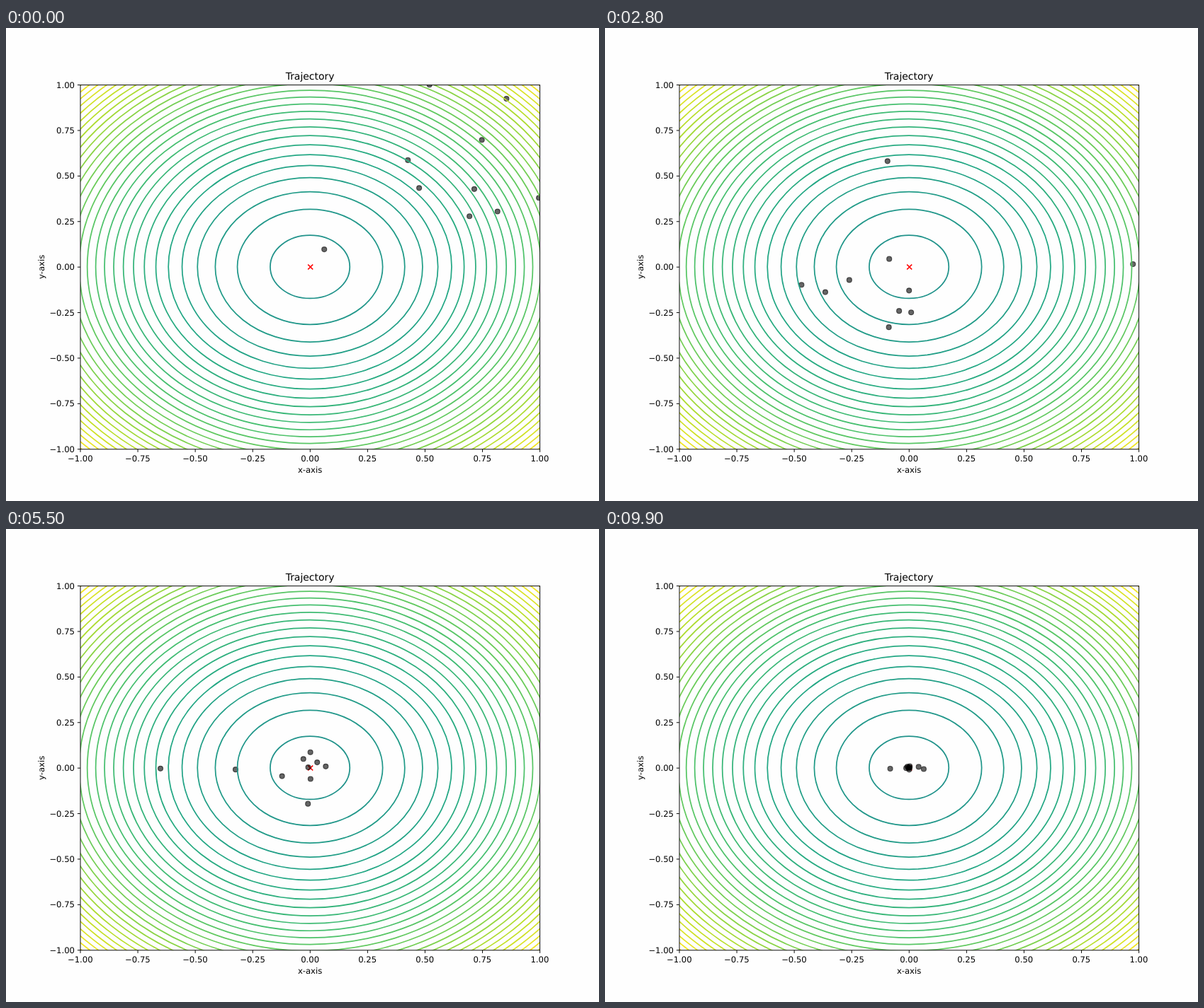
Recreate the animation shown at these times as an HTML page. Size 837 px wide and 669 px high, loop 10000 ms.

```html
<!DOCTYPE html>
<html lang="en">
<head>
<meta charset="utf-8">
<title>Trajectory</title>
<style>
  html, body { margin: 0; width: 100%; height: 100%; overflow: hidden; background: #fefefe; }
  svg { display: block; width: 837px; height: 669px; }
  text { font-family: "DejaVu Sans", sans-serif; font-size: 11.63px; text-rendering: geometricPrecision; }
</style>
</head>
<body>
<svg id="stage" viewBox="0 0 837 669"></svg>
<script>
const NS = "http://www.w3.org/2000/svg";
const stage = document.getElementById("stage");
const CENTER = { x: 429.1, y: 337.85 }, HALF = { x: 324.3, y: 257.6 };
const BOX = { left: 105, top: 80.6, right: 753.6, bottom: 595.8 };
const STEP_MS = 100, STEPS = 100;

function add(parent, name, attrs, content) {
  const node = document.createElementNS(NS, name);
  for (const key in attrs) node.setAttribute(key, attrs[key]);
  if (content) node.textContent = content;
  parent.appendChild(node);
  return node;
}

function addLabel(content, attrs) {
  add(stage, "text", { "text-anchor": "middle", ...attrs }, content);
}

const toX = x => CENTER.x + x * HALF.x;
const toY = y => CENTER.y - y * HALF.y;

// Teal to yellow, evenly spaced stops
const RAMP = [[33, 145, 140], [34, 168, 132], [68, 191, 112], [122, 209, 81], [189, 223, 38], [253, 231, 37]];
function levelColor(level) {
  const pos = ((level + 2) / 3.99 - 0.5) * 10;
  const i = Math.min(RAMP.length - 2, Math.floor(pos));
  return `rgb(${RAMP[i].map((c, k) => Math.round(c + (RAMP[i + 1][k] - c) * (pos - i)))})`;
}

// Where the particles start, in plot units
const STARTS = [
  [0.52, 1], [0.855, 0.923], [0.748, 0.697], [0.426, 0.586], [0.475, 0.433],
  [0.715, 0.427], [0.996, 0.379], [0.816, 0.304], [0.694, 0.278], [0.062, 0.096]
];

function makeRandom(seed) {
  return () => (seed = (seed * 16807) % 2147483647) / 2147483647;
}

// Particle swarm search: inertia plus pulls to personal and shared best
function simulate() {
  const random = makeRandom(4711);
  const cost = ([x, y]) => x * x + y * y;
  const swarm = STARTS.map(pos => ({ pos, best: pos, vel: [random(), random()] }));
  const steps = [];
  for (let n = 0; n < STEPS; n++) {
    steps.push(swarm.map(p => p.pos));
    for (const p of swarm) if (cost(p.pos) < cost(p.best)) p.best = p.pos;
    const lead = swarm.reduce((a, b) => cost(b.best) < cost(a.best) ? b : a).best;
    for (const p of swarm) {
      p.vel = p.vel.map((v, k) => 0.9 * v
        + 0.5 * random() * (p.best[k] - p.pos[k])
        + 0.3 * random() * (lead[k] - p.pos[k]));
      p.pos = p.pos.map((x, k) => x + p.vel[k]);
    }
  }
  return steps;
}

const frame = { x: BOX.left, y: BOX.top, width: BOX.right - BOX.left, height: BOX.bottom - BOX.top };
add(add(add(stage, "defs"), "clipPath", { id: "plot" }), "rect", frame);
const plot = add(stage, "g", { "clip-path": "url(#plot)" });

add(plot, "path", { d: "M426.2 334.5l7 7m0 -7l-7 7", stroke: "#f00", "stroke-width": 1.74 });

const dots = STARTS.map(() => add(plot, "circle", {
  r: 3.49, fill: "#000", "fill-opacity": 0.6, stroke: "#000", "stroke-opacity": 0.6, "stroke-width": 1.16
}));

for (let level = 0.03; level < 2; level += 0.07) {
  const radius = Math.sqrt(level);
  add(plot, "ellipse", {
    cx: CENTER.x, cy: CENTER.y, rx: radius * HALF.x, ry: radius * HALF.y,
    fill: "none", stroke: levelColor(level), "stroke-width": 1.74
  });
}

const line = { fill: "none", stroke: "#000", "stroke-width": 0.95 };
add(stage, "rect", { ...frame, ...line });

for (let value = -1; value <= 1; value += 0.25) {
  const x = toX(value), y = toY(value);
  const label = value.toFixed(2).replace("-", "\u2212");
  add(stage, "path", { d: `M${x + 0.2} ${BOX.bottom}v4.1M${BOX.left} ${y + 0.3}h-4.1`, ...line });
  addLabel(label, { x, y: 612.5 });
  addLabel(label, { x: 97, y: y + 4.3, "text-anchor": "end" });
}

addLabel("x-axis", { x: CENTER.x, y: 628.5 });
addLabel("y-axis", { transform: `translate(53.8 ${CENTER.y}) rotate(-90)` });
addLabel("Trajectory", { x: CENTER.x, y: 73.4, style: "font-size: 13.95px" });

const steps = simulate();

function draw(ms) {
  const positions = steps[Math.floor(ms / STEP_MS) % STEPS];
  dots.forEach((dot, i) => {
    const [x, y] = positions[i];
    dot.setAttribute("cx", toX(x));
    dot.setAttribute("cy", toY(y));
  });
}

const start = performance.now();
function tick() {
  draw(performance.now() - start);
  requestAnimationFrame(tick);
}
tick();
</script>
</body>
</html>
```
